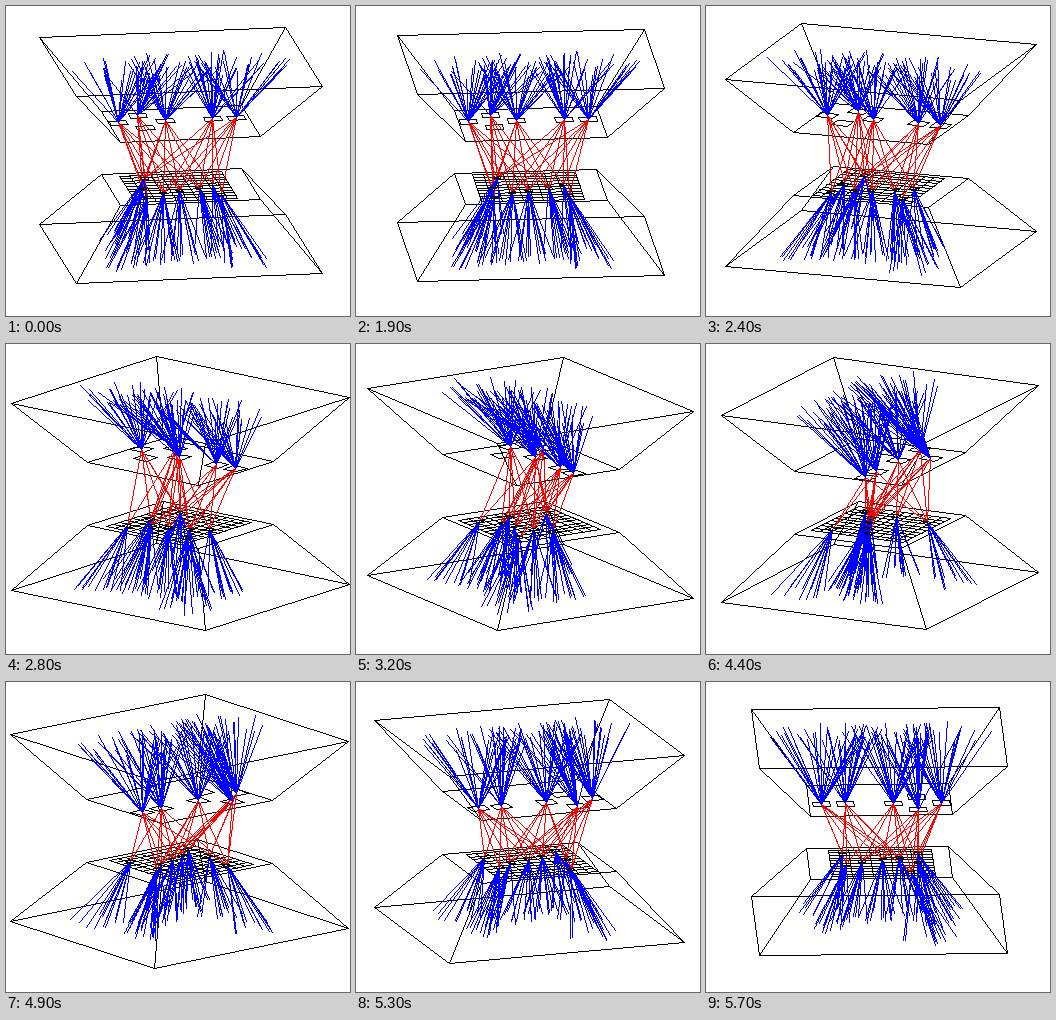
Recreate the animation shown at these times as a matplotlib script. Size 344 by 310 pixels, loop 6600 ms.

```python
import numpy as np
import matplotlib.pyplot as plt
from matplotlib.animation import FuncAnimation

W, H, DPI = 344, 310, 100
AXIS_X = 173.75
TILT = np.sin(np.radians(15))
BLACK, RED, BLUE = (0, 0, 0), (255, 0, 0), (0, 0, 255)
rng = np.random.default_rng(11)

# Screen heights of the four planes, top to bottom
TOP, MODULE, GRID, BOTTOM = 55.5, 117.5, 180.5, 242.5


def rect(cx, cz, hx, hz, y):
    """Outline of a horizontal rectangle as segments of (x, z, height)."""
    corners = [(cx + i * hx, cz + j * hz, y)
               for i, j in ((-1, -1), (1, -1), (1, 1), (-1, 1))]
    return list(zip(corners, corners[1:] + corners[:1]))


def frustum(y_wide, y_narrow):
    wide = rect(0.75, 0, 124.3, 115, y_wide)
    narrow = rect(0.75, 0, 71.2, 60, y_narrow)
    return wide + narrow + [(a[0], b[0]) for a, b in zip(wide, narrow)]


def lattice(cx, half, cells, y):
    lines = []
    for t in np.linspace(-half, half, cells + 1):
        lines.append(((cx + t, -half, y), (cx + t, half, y)))
        lines.append(((cx - half, t, y), (cx + half, t, y)))
    return lines


def fan(apex, y0, center, radius, count, y1):
    """Rays from an apex to random points of a disc on another plane."""
    r = radius * np.sqrt(rng.random(count))
    a = 2 * np.pi * rng.random(count)
    return [((*apex, y0), (center[0] + x, center[1] + z, y1))
            for x, z in zip(r * np.cos(a), r * np.sin(a))]


def nearest(point, others, count):
    return sorted(others, key=lambda o: np.hypot(o[0] - point[0], o[1] - point[1]))[:count]


def cell(col, row):
    return -60.6 + 24 * col, -38 + 24 * row


modules = [cell(0, 1), cell(1, 0), cell(2, 1), cell(4, 1), cell(5, 1)]
spare = cell(1, 2)
nodes = [(-38, 1), (-30, -38), (-39, 36), (-20, 21),
         (-3, 15), (18, 7), (34, -5), (36, 35)]

black = frustum(TOP, MODULE) + frustum(BOTTOM, GRID) + lattice(-1.5, 51.5, 10, GRID)
for x, z in modules + [spare]:
    black += rect(x, z, 8.6, 8.6, MODULE)

blue, red, marks = [], [], []
for m in modules:
    blue += fan(m, MODULE, (m[0], 10), 53, 23, TOP)
    red += [((*m, MODULE), (*n, GRID)) for n in nearest(m, nodes, 6)]
for x, z in nodes:
    blue += fan((x, z), GRID, (1.6 * x, 1.6 * z + 5), 29, 12, BOTTOM)
    marks += rect(x, z, 3.5, 3.5, GRID)

layers = [(np.array(lines, dtype=float), color) for lines, color in
          ((black, BLACK), (red, RED), (blue, BLUE), (marks, BLACK))]


def project(points, angle):
    x, z, y = np.moveaxis(points, -1, 0)
    c, s = np.cos(angle), np.sin(angle)
    return np.stack([AXIS_X + x * c + z * s, y + TILT * (z * c - x * s)], axis=-1)


def stroke(canvas, p, q, color):
    """Hard-edged line one pixel wide."""
    n = int(np.abs(q - p).max()) + 1
    x, y = np.rint(np.linspace(p, q, n)).astype(int).T
    canvas[np.clip(y, 0, H - 1), np.clip(x, 0, W - 1)] = color


fig = plt.figure(figsize=(W / DPI, H / DPI), dpi=DPI, facecolor="white")
ax = fig.add_axes([0, 0, 1, 1])
ax.axis("off")
picture = ax.imshow(np.full((H, W, 3), 255, np.uint8), interpolation="nearest",
                    aspect="auto", extent=(0, W, H, 0))


def draw(n):
    # Steady turn between two resting views
    step = max(n - 18, 0)
    angle = np.radians(np.clip(9.9 - 4.88 * step, -177.9, 9.3))
    canvas = np.full((H, W, 3), 255, np.uint8)
    for points, color in layers:
        for p, q in np.rint(project(points, angle)):
            stroke(canvas, p, q, color)
    picture.set_data(canvas)
    return [picture]


anim = FuncAnimation(fig, draw, frames=66, interval=100, repeat=True,
                     repeat_delay=0, blit=False)
plt.show()
```
